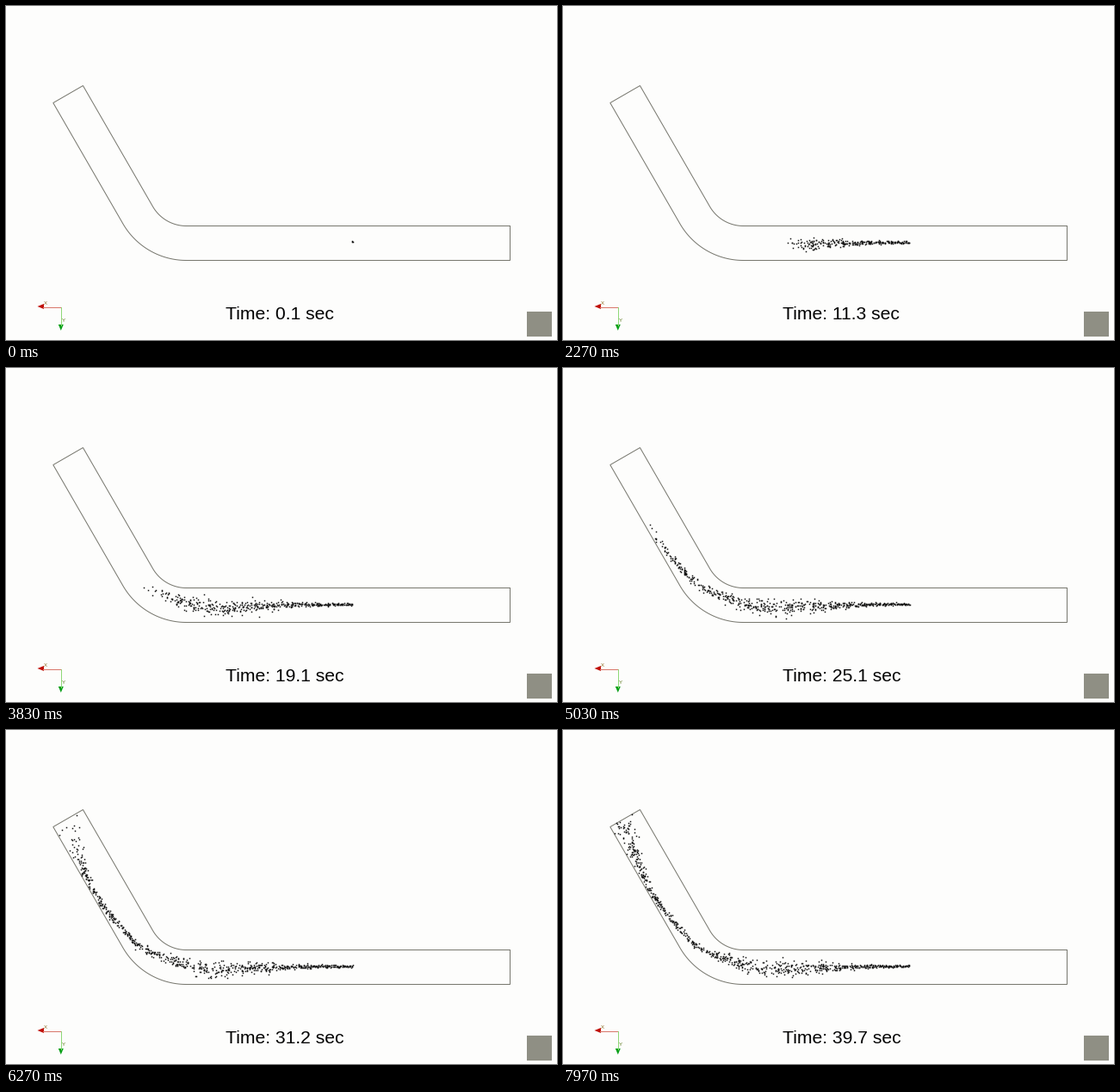
Write a matplotlib script that moves like this. It is 640x388 px and loops after 8 s.

```python
import numpy as np
import matplotlib.pyplot as plt
from matplotlib.animation import FuncAnimation
from matplotlib.patches import Polygon, Rectangle

W, H, DPI = 640, 388, 100
PX = 72 / DPI              # one pixel in points
TICK, LOOP = 20, 8000      # ms
PAPER, WALL, INK = "#fdfdfc", "#77776e", "#101010"

# Pipe: straight run, 60 degree bend around (CX, CY), inclined arm
CX, CY, RIGHT = 209.5, 210.5, 585.5
MID, HALF, ARM = 65, 20, 162.2
TURN = np.pi / 3
BEND = MID * TURN

# Plume
SOURCE = 403 - CX          # distance from the inlet to the bend
EXIT = SOURCE + BEND + ARM
RATE = 22                  # particles released per second
N = RATE * 40

fig = plt.figure(figsize=(W / DPI, H / DPI), dpi=DPI, facecolor=PAPER)
ax = fig.add_axes([0, 0, 1, 1])
ax.set(xlim=(0, W), ylim=(H, 0))
ax.axis("off")


def line(x, y, color):
    ax.plot(x, y, color=color, lw=PX, solid_joinstyle="miter")


def label(x, y, text, size, color):
    return ax.text(x, y, text, fontsize=size * PX, color=color,
                   family="Liberation Sans", va="baseline")


def place(s, off):
    """Point at distance s past the bend's start, off towards the outer wall."""
    a = np.clip(s / MID, 0, TURN)
    rest = np.where(s < 0, s, np.maximum(s - BEND, 0))
    r = MID + off
    return (CX - r * np.sin(a) - rest * np.cos(a),
            CY + r * np.cos(a) - rest * np.sin(a))


s = np.r_[CX - RIGHT, np.linspace(0, BEND, 50), BEND + ARM]
xi, yi = place(s, -HALF)
xo, yo = place(s, HALF)
line(np.r_[xi, xo[::-1], xi[0]], np.r_[yi, yo[::-1], yi[0]], WALL)

# Axis marker
line([43, 63.5], [349.5, 349.5], "#d8776a")
line([63.5, 63.5], [349.5, 371], "#8fd878")
ax.add_patch(Polygon([(36.5, 349), (44, 346), (44, 352)], color="#c01008", lw=0))
ax.add_patch(Polygon([(63.8, 377), (60.8, 370), (66.8, 370)], color="#08a018", lw=0))
label(44, 347, "X", 6, "#8a6a20")
label(65, 367, "Y", 6, "#5f7a20")

ax.add_patch(Rectangle((605, 355), 29, 29, color="#8f8f84", lw=0))

clock = label(254.8, 364, "", 21.2, "#000000")
dots, = ax.plot([], [], "s", ms=1.5 * PX, color=INK, mew=0)

rng = np.random.default_rng(12)
birth = np.arange(N) / RATE
speed = np.clip(rng.normal(1, 0.06, N), 0.85, 1.16)
drift = rng.normal(0, 0.8, N)
phase = rng.uniform(0, 2 * np.pi, N)
swirl = rng.uniform(0.4, 1.1, N)


def bump(s, centre, width):
    return np.exp(-((s - centre) / width) ** 2)


def travel(age):
    # quick release, steady flow, then faster past the bend
    return 11 * age + 8 * (1 - np.exp(-age / 4)) + 3 * np.maximum(age - 17, 0)


def particles(t):
    age = np.maximum(t - birth, 0)
    s = travel(age * speed)
    sag = bump(s, 155, 70)
    # sinks a little, cuts the inner corner, then hugs the outer wall
    centre = 3 * sag - 1.2 - 8 * bump(s, 220, 30) + 17.5 * bump(s, 335, 75)
    spread = 0.7 + s / 320 + 3.8 * sag + 6 * bump(s, 435, 50)
    off = centre + spread * (drift + 0.7 * np.sin(phase + swirl * age))
    limit = HALF - 0.8
    off = limit - np.abs(limit - off)      # bounce off the outer wall
    show = (birth <= t) & (s < EXIT)
    return place(s[show] - SOURCE, off[show])


def update(n):
    # the flow advances 30 steps per second of playback
    step = int((n * TICK + TICK / 2 + 3.4) * 0.03)
    t = max(0.1, step * 0.1664)
    clock.set_text(f"Time: {int(t * 10) / 10:.1f} sec")
    dots.set_data(*particles(t))
    return clock, dots


anim = FuncAnimation(fig, update, frames=LOOP // TICK, interval=TICK,
                     init_func=lambda: update(0), repeat=True, repeat_delay=0)
plt.show()
```
